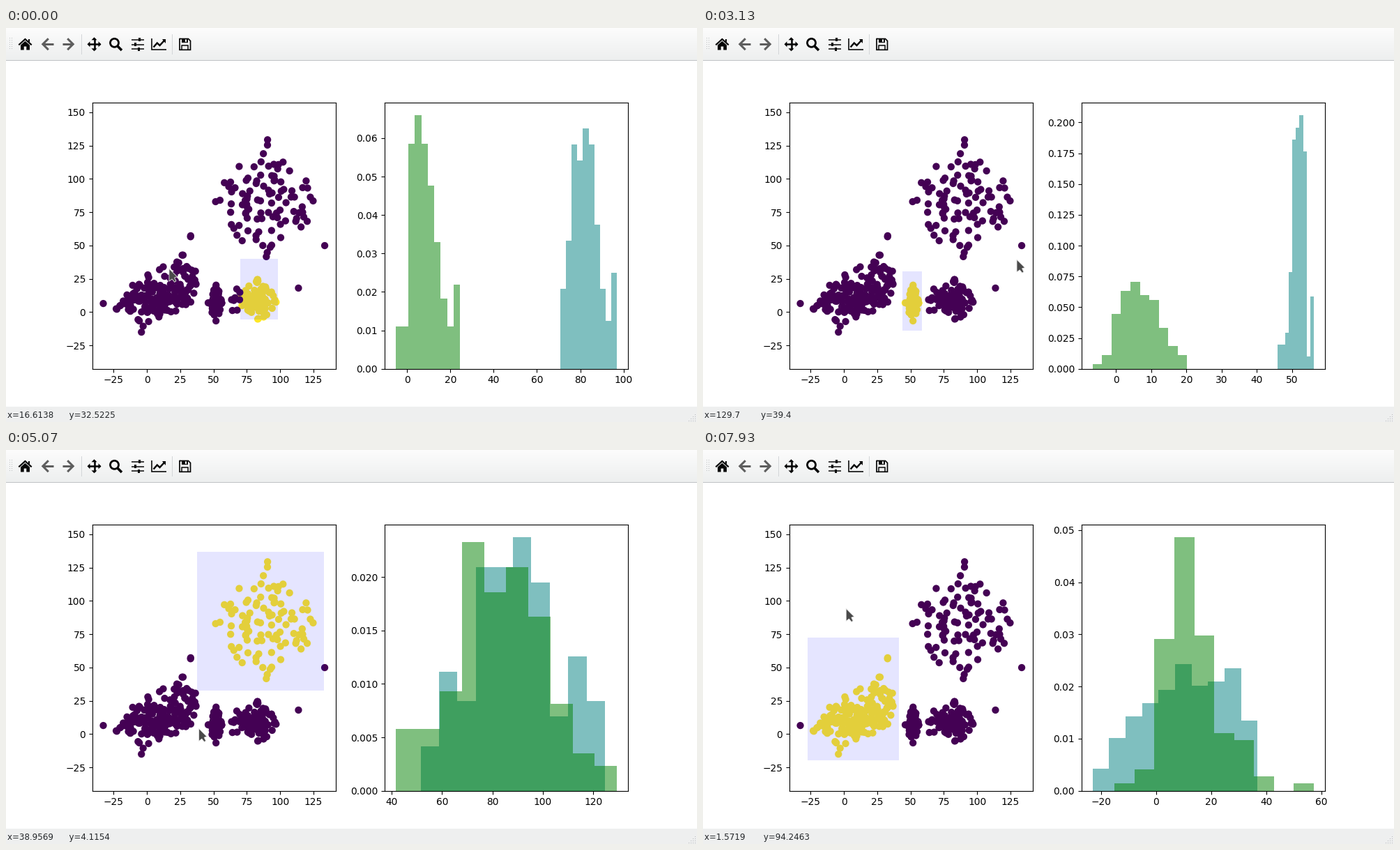
Animation of 991 by 565 pixels, one loop 8 s. Source, as a matplotlib script:

```python
import matplotlib.pyplot as plt
import numpy as np
from matplotlib.animation import FuncAnimation
from matplotlib.patches import Circle, Polygon, Rectangle
from matplotlib.ticker import MultipleLocator

W, H, DPI = 991, 565, 100
FRAMES, INTERVAL = 160, 50
X0, SX, Y0, SY = 202.2, 1.9106, 407.3, 1.909   # scatter origin and scale in pixels
TOP, BOTTOM = 107.3, 488.7
INK, GREY = "#050505", "#5e5e5e"

rng = np.random.default_rng(12)
plt.rcParams.update({"font.family": "DejaVu Sans", "font.size": 9.91,
                     "toolbar": "None"})
fig = plt.figure(figsize=(W / DPI, H / DPI), dpi=DPI, facecolor="white")


def add_axes(left, top, right, bottom, **kw):
    box = [left / W, 1 - bottom / H, (right - left) / W, (bottom - top) / H]
    return fig.add_axes(box, **kw)


# ---------- data ----------
# Each cluster: x range, x counts, y range, y counts, correlation, tick steps.
CLUSTERS = [
    ((70.8, 96.9), [5, 8, 14, 13, 15, 14, 9, 5, 3, 6],
     (-5.3, 24.4), [3, 3, 16, 18, 16, 13, 9, 5, 3, 6], 0, (20, 0.01)),
    ((45.95, 56.16), [2, 2, 3, 8, 19, 20, 21, 18, 1, 6],
     (-6.65, 20.2), [1, 3, 12, 17, 19, 16, 15, 9, 5, 3], 0, (10, 0.025)),
    ((51.5, 124.7), [3, 8, 6, 15, 15, 17, 14, 5, 9, 6],
     (41.6, 129.4), [5, 5, 8, 20, 16, 18, 14, 7, 3, 2], 0, (20, 0.005)),
    ((-23.1, 36.8), [5, 12, 17, 20, 23, 29, 24, 25, 28, 16],
     (-15.1, 57.28), [2, 6, 42, 70, 43, 16, 14, 4, 0, 2], 0.4, (20, 0.01)),
]


def spread(span, counts):
    """Random values whose histogram has the given counts."""
    edges = np.linspace(*span, len(counts) + 1)
    v = rng.uniform(np.repeat(edges[:-1], counts), np.repeat(edges[1:], counts))
    v[0], v[-1] = span
    return v


def pair(x, y, rho):
    """Match x with y at a given correlation, keeping the cloud elliptic."""
    zx = (x - x.mean()) / x.std()
    mix = rho * zx + np.sqrt(1 - rho ** 2) * rng.normal(size=len(x))
    y = np.sort(y)[mix.argsort().argsort()]
    zy = (y - y.mean()) / y.std()

    def excess(i, j):
        a, b = zx[i], zy[j]
        return max(a * a - 2 * rho * a * b + b * b - 4 * (1 - rho ** 2), 0)

    for i, j in rng.integers(len(x), size=(4000, 2)):
        if excess(i, j) + excess(j, i) < excess(i, i) + excess(j, j):
            y[[i, j]], zy[[i, j]] = y[[j, i]], zy[[j, i]]
    return np.column_stack([x, y])


groups = [pair(spread(xs, xn), spread(ys, yn), rho)
          for xs, xn, ys, yn, rho, _ in CLUSTERS]
strays = [(-32.8, 6.4), (133.4, 49.9), (113.7, 18)]
fringe = np.column_stack([rng.uniform(63, 70, 8), rng.uniform(1, 18, 8)])
groups.append(np.vstack([strays, fringe]))
points = np.vstack(groups)
member = np.repeat(np.arange(len(groups)), [len(g) for g in groups])

# ---------- plots ----------
left = add_axes(123.9, TOP, 473, BOTTOM)
dots = left.scatter(points[:, 0], points[:, 1], c=(member == 0).astype(float),
                    cmap="viridis", vmin=0, vmax=1, s=35, linewidths=1.48)
selection = left.add_patch(Rectangle((0, 0), 1, 1, fc="blue", lw=0, alpha=0.1,
                                     zorder=3))
left.set_xlim((123.9 - X0) / SX, (473 - X0) / SX)
left.set_ylim((Y0 - BOTTOM) / SY, (Y0 - TOP) / SY)
left.xaxis.set_major_locator(MultipleLocator(25))
left.yaxis.set_major_locator(MultipleLocator(25))


def hist_axes(i):
    ax = add_axes(542.9, TOP, 891.9, BOTTOM, label=f"hist{i}")
    for values, color in zip(groups[i].T, ("teal", "green")):
        ax.hist(values, bins=10, density=True, color=color, alpha=0.5)
    xstep, ystep = CLUSTERS[i][-1]
    ax.xaxis.set_major_locator(MultipleLocator(xstep))
    ax.yaxis.set_major_locator(MultipleLocator(ystep))
    return ax


hists = [hist_axes(i) for i in range(len(CLUSTERS))]

# ---------- window ----------
stage = add_axes(0, 0, W, H, zorder=10)
stage.axis("off")


def rect(x0, y0, x1, y1, color):
    stage.add_patch(Rectangle((x0, y0), x1 - x0, y1 - y0, fc=color, lw=0))


def line(pts, width, color=INK):
    x, y = zip(*pts)
    stage.plot(x, y, color=color, lw=width * 0.72, solid_capstyle="butt",
               solid_joinstyle="miter")


def poly(pts, color=INK):
    stage.add_patch(Polygon(pts, fc=color, lw=0))


def toolbar():
    shade = np.linspace([252, 252, 252], [237, 239, 239], 46)[:, None, :] / 255
    stage.imshow(shade, extent=(0, W, 46, 0), aspect="auto", zorder=0)
    rect(0, 46, W, 47, "#bfc2c4")
    for x in (108, 238):
        rect(x, 9, x + 1, 38, "#d3d6d8")
    for k in range(6):
        for x in (5, 8):
            rect(x, 14 + 3 * k, x + 1, 15 + 3 * k, "#bcbfc1")

    # home
    line([(18.3, 24.3), (27.5, 16), (36.7, 24.3)], 2.2)
    poly([(21, 24.5), (27.5, 18.8), (34, 24.5), (34, 31.5), (29.3, 31.5),
          (29.3, 26.5), (25.7, 26.5), (25.7, 31.5), (21, 31.5)])
    rect(32, 15.5, 34.3, 21, INK)
    # back and forward
    for x, d in ((51.8, 1), (97.2, -1)):
        line([(x + d, 23.2), (x + 16 * d, 23.2)], 3, GREY)
        line([(x + 9 * d, 15.2), (x + d, 23.2), (x + 9 * d, 31.2)], 3, GREY)
    # pan
    cx, cy = 126.5, 23.3
    line([(cx - 8, cy), (cx + 8, cy)], 2.6)
    line([(cx, cy - 8), (cx, cy + 8)], 2.6)
    for dx, dy in ((1, 0), (-1, 0), (0, 1), (0, -1)):
        bx, by = cx + 6 * dx, cy + 6 * dy
        poly([(cx + 10 * dx, cy + 10 * dy), (bx + 4 * dy, by + 4 * dx),
              (bx - 4 * dy, by - 4 * dx)])
    # zoom
    stage.add_patch(Circle((155.5, 21.3), 6, fill=False, ec=INK, lw=2))
    line([(159.5, 25.5), (166, 32)], 3.6)
    # sliders
    for y, knob in ((16.5, 190), (23.5, 183.5), (30.3, 188.5)):
        line([(179.5, y), (197.5, y)], 1.5)
        rect(knob, y - 2.6, knob + 3.2, y + 2.6, INK)
    # chart
    line([(209, 14.5), (209, 31), (230, 31)], 1.6)
    line([(211.5, 27.5), (216.8, 21.5), (220.5, 25), (227, 18)], 2.4)
    poly([(223.5, 15.8), (229.3, 15.8), (229.3, 21.6)])
    # save
    line([(249, 15.5), (261.5, 15.5), (264.5, 18.5), (264.5, 31.3),
          (249, 31.3), (249, 14.8)], 1.7)
    rect(252, 15, 260.5, 20.8, INK)
    rect(256.8, 16.2, 258.8, 19.6, "#f4f5f5")
    line([(252.2, 31), (252.2, 25.2), (261.3, 25.2), (261.3, 31)], 1.5)


def status_bar():
    rect(0, 543, W, H, "#eeefef")
    for row in range(4):
        for col in range(row + 1):
            x, y = 988 - 3 * col, 554 + 3 * row
            rect(x, y, x + 1, y + 1, "#b4b7b9")


toolbar()
status_bar()
status = stage.text(2, 559, "", fontsize=8.56, color="#232629", va="baseline")
ARROW = np.array([(0, 0), (0, 18), (4.2, 14.8), (7.8, 19.2), (10, 17.6),
                  (7.6, 12.8), (11.6, 11.6)])
cursor = stage.add_patch(Polygon(ARROW, fc="#4a4a4a", ec="#e8e8e8", lw=0.6,
                                 zorder=9))
stage.set_xlim(0, W)
stage.set_ylim(H, 0)

# ---------- motion: times in steps, 15 per second; places in data units ----------
START = (16.6138, 32.5225)
MOVES = [  # from step, to step, x, y
    (1, 13, 43.9, 30.5), (14, 23, 58.5, -14), (33, 39, 125.0627, 27.974),
    (40, 46, 129.7, 39.4), (47, 51, 132.8, 32.6), (54, 62, 37.3613, 136.779),
    (69, 80, 39.2, -16.1), (81, 82, 40.5, -17.7), (85, 86, 40.9922, -19.865),
    (89, 98, -27.4746, 72.4614), (101, 105, 41.8, 8), (110, 119, 1.5719, 94.2463)]
DRAGS = [(14, 23, 29), (54, 62, 72), (89, 98, 105)]   # press, stop, redraw
FIRST_BOX = (70, -5.6), (98.3, 40)


def pointer(t):
    pos = np.array(START)
    for t0, t1, x, y in MOVES:
        p = np.clip((t - t0) / (t1 - t0), 0, 1)
        pos += (np.array([x, y]) - pos) * (1 - (1 - p) ** 2)
    return pos


def readout(step):
    """The status line trails the pointer during a drag."""
    for press, stop, redraw in DRAGS:
        if press <= step < redraw:
            return pointer(min(step - 1, stop))
    return pointer(step)


def drag_box(step):
    """The box trails further and catches up at the redraw."""
    box = FIRST_BOX
    for press, stop, redraw in DRAGS:
        if step >= press + 2:
            seen = stop if step >= redraw else min(step - 2.4, stop - 1.5)
            box = pointer(press), pointer(max(seen, press))
    return box


def update(frame):
    step = (3 * frame + 2) // 4
    chosen = sum(step >= redraw for *_, redraw in DRAGS)
    dots.set_array((member == chosen).astype(float))
    for i, ax in enumerate(hists):
        ax.set_visible(i == chosen)
    (x0, y0), (x1, y1) = drag_box(step)
    selection.set_bounds(x0, y0, x1 - x0, y1 - y0)
    px, py = pointer(step)
    cursor.set_xy(ARROW + (X0 + SX * px, Y0 - SY * py))
    x, y = readout(step)
    status.set_text(f"x={x:<12g} y={y:<12g}")
    return [dots, selection, cursor, status]


update(0)
anim = FuncAnimation(fig, update, frames=FRAMES, interval=INTERVAL,
                     repeat=True, blit=False)
plt.show()
```
